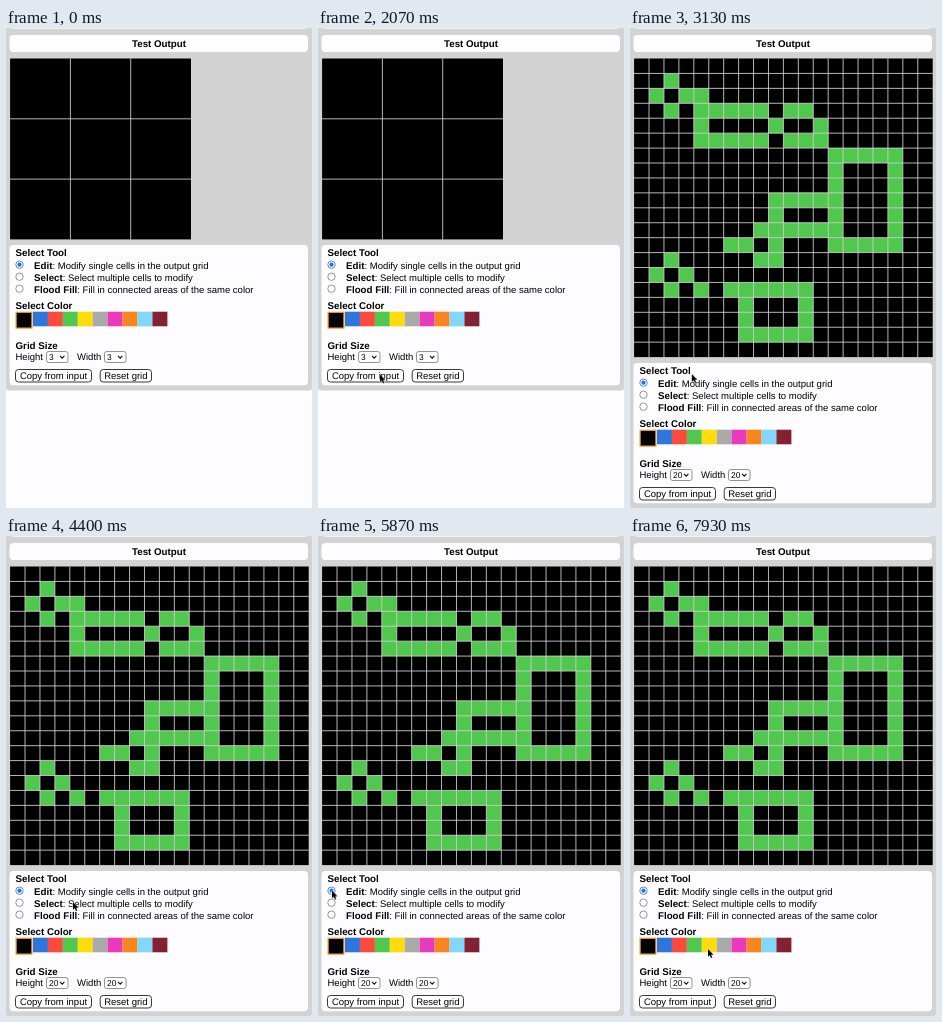
Recreate the animation shown at these times as an HTML page. Size 306 by 480 pixels, loop 8 s.

```html
<!DOCTYPE html>
<html lang="en">
<head>
<meta charset="utf-8">
<title>Grid editor</title>
<style>
  html, body { margin: 0; width: 100%; height: 100%; overflow: hidden; background: #fdfcfe; }
  svg { display: block; width: 306px; height: 480px; }
  text { font: 9.52px "Liberation Sans", Arial, sans-serif; text-rendering: geometricPrecision; white-space: pre; }
  .b { font-weight: 700; font-size: 9.75px; }
  .mid { text-anchor: middle; }
  .small { font-size: 8.4px; }
  .panel { fill: #fdfcfe; }
</style>
</head>
<body>
<svg id="stage" viewBox="0 0 306 480"></svg>
<script>
const LOOP = 8000, SHOW_AT = 800, COPY_AT = 3128;
const GREEN = '#4fc84d';
const COLORS = ['#2f76dc', '#fa4b3d', GREEN, '#ffdc0a', '#aaaaaa', '#e83abb', '#f8861f', '#83d6fc', '#822130'];

// The drawing, in cells, traced with a pen one cell wide
const box = (x, y, w, h) => `M${x + .5} ${y + .5}h${w - 1}v${h - 1}h${1 - w}z`;
const run = (x, y, w = 1) => `M${x} ${y + .5}h${w}`;
const diamond = (x, y) => run(x, y - 1) + run(x - 1, y) + run(x + 1, y) + run(x, y + 1);
const DRAWING = [
  diamond(2, 2), run(4, 2), 'M9 3.5H4.5V5.5H9', run(9, 4), run(10, 3, 2), 'M12.5 4V5.5H10',
  box(13, 6, 5, 7), box(9, 9, 5, 3), run(8, 11), run(6, 12, 2), run(9, 12), run(8, 13, 2),
  diamond(2, 14), run(4, 15), run(6, 15), box(7, 15, 5, 4)
].join('');

// Where the pointer goes: [time, x, y]
const STOPS = [
  [SHOW_AT, 50, 422], [1130, 54, 368.5], [1530, 62, 346.3], [3800, 61.7, 346],
  [4400, 67, 366], [4950, 70, 416], [5620, 3, 361], [5870, 14, 354.5],
  [6400, 14, 356], [7050, 62, 408], [7930, 78, 413]
];

const rect = (x, y, w, h, fill, more = '') =>
  `<rect x="${x}" y="${y}" width="${w}" height="${h}" fill="${fill}" ${more}/>`;
const text = (x, y, s, cls = '') => `<text x="${x}" y="${y}" class="${cls}">${s}</text>`;
const panel = (y, h) => `<rect class="panel" x="3.5" y="${y}" width="298.5" height="${h}" rx="4"/>`;

function grid(n, pitch, drawing) {
  const size = n * pitch;
  let lines = '';
  for (let p = pitch; p < size - 1; p += pitch) lines += `M${p} 0v${size}M0 ${p}h${size}`;
  return `<g transform="translate(4.1 30.5)" fill="none">${rect(0, 0, size, size, '#000')}
    <path d="${drawing}" transform="scale(${pitch})" stroke="${GREEN}"/>
    <path d="${lines}" stroke="#cdcdcd" stroke-width=".88"/></g>`;
}

function radio(y, name, info, on) {
  const color = on ? '#2273d6' : '#7c7c7c';
  return `<circle cx="13.5" cy="${y}" r="3.7" fill="#fff" stroke="${color}" stroke-width=".8"/>
    ${on ? `<circle cx="13.5" cy="${y}" r="2.1" fill="${color}"/>` : ''}
    <text x="28" y="${y + 4}"><tspan class="b">${name}</tspan>: ${info}</text>`;
}

const select = (x, n) =>
  rect(x + .5, 323.5, 21.5, 11, '#fff', 'rx="2.2" stroke="#777" stroke-width=".8"') +
  text(x + 3, 332.2, n, 'small') +
  `<path d="M${x + 14} 327.8l2.2 2.3l2.2-2.3" fill="none" stroke="#111" stroke-width="1.1"/>`;

const button = (x, w, label) =>
  rect(x, 341.5, w, 12.5, '#fff', 'rx="3" stroke="#222" stroke-width=".9"') +
  text(x + w / 2, 351, label, 'mid');

const controls = n =>
  panel(217, 140.2) +
  text(9.5, 228.4, 'Select Tool', 'b') +
  radio(236.7, 'Edit', 'Modify single cells in the output grid', true) +
  radio(248.7, 'Select', 'Select multiple cells to modify') +
  radio(260.7, 'Flood Fill', 'Fill in connected areas of the same color') +
  text(9.5, 281, 'Select Color', 'b') +
  COLORS.map((c, i) => rect(27 + i * 14.93, 283.7, 14.95, 14.6, c)).join('') +
  rect(10.1, 284.3, 15.8, 15.8, '#000', 'stroke="#f0a21c" stroke-width="1.2"') +
  text(9.5, 321, 'Grid Size', 'b') +
  text(9.5, 332.2, 'Height') + select(40, n) +
  text(71, 332.2, 'Width') + select(98, n) +
  button(9.5, 76, 'Copy from input') + button(94.2, 51.3, 'Reset grid');

const scene = (id, n, pitch, shift, drawing) => `<g id="${id}">
  ${rect(0, -8, 306, 370.6 + shift, '#d3d3d3', 'rx="3"')}
  ${panel(-12, 12.8)}${panel(7, 17.1)}
  ${text(153, 18.5, 'Test Output', 'b mid')}
  ${grid(n, pitch, drawing)}
  <g transform="translate(0 ${shift})">${controls(n)}</g></g>`;

document.getElementById('stage').innerHTML =
  scene('before', 3, 60.3, 0, '') +
  scene('after', 20, 14.93, 118, DRAWING) +
  `<g id="pointer"><path d="M0 0V7.8L1.8 6.2L3 9.1L4.3 8.5L3.1 5.7H5.5Z"
    stroke="#fff" stroke-width=".8" paint-order="stroke"/></g>`;

const play = (id, frames) =>
  document.getElementById(id).animate(frames, { duration: LOOP, iterations: Infinity });

const flip = (from, to, at) => [
  { opacity: from, easing: 'step-end' },
  { opacity: to, offset: at / LOOP, easing: 'step-end' },
  { opacity: to }
];

const stop = ([t, x, y]) =>
  ({ offset: t / LOOP, transform: `translate(${x}px, ${y}px)`, easing: 'ease-in-out' });
const first = STOPS[0], last = STOPS[STOPS.length - 1];

play('before', flip(1, 0, COPY_AT));
play('after', flip(0, 1, COPY_AT));
play('pointer', flip(0, 1, SHOW_AT));
play('pointer', [[0, first[1], first[2]], ...STOPS, [LOOP, last[1], last[2]]].map(stop));
</script>
</body>
</html>
```
